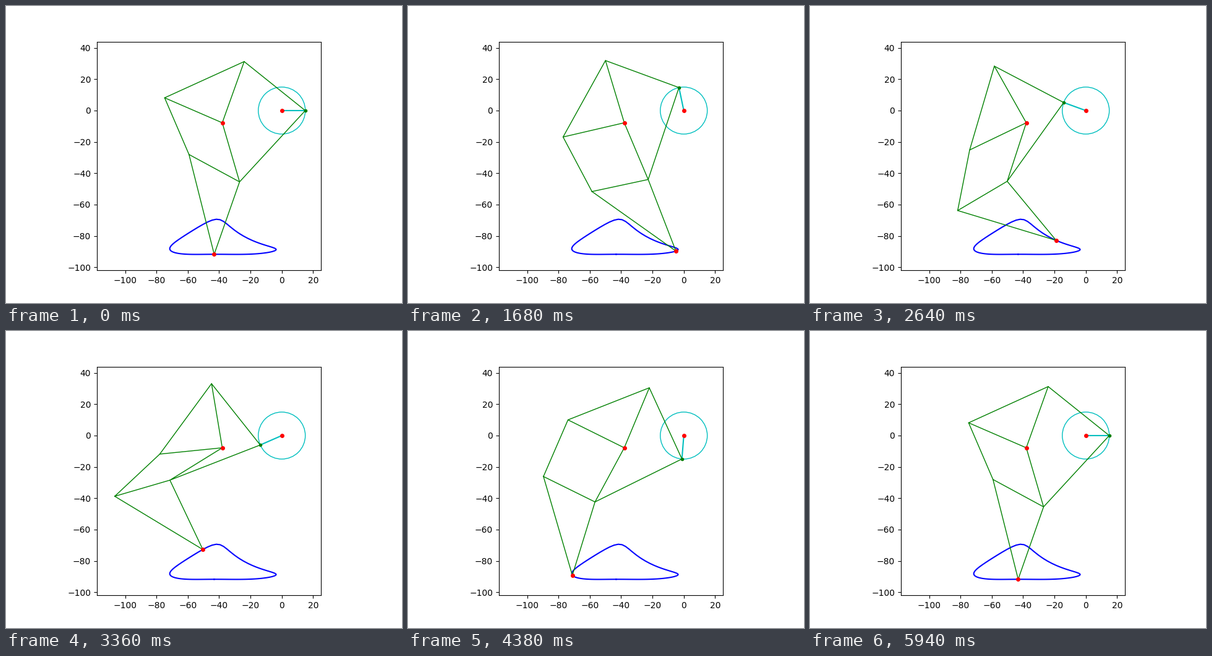
A matplotlib script for the animation above (6 s loop, 640 by 480 pixels).

```python
import numpy as np
import matplotlib.pyplot as plt
from matplotlib.animation import FuncAnimation

FRAMES = 100
CRANK = 15
PIVOT = complex(-38, -7.8)


def meet(p, q, rp, rq):
    """Point at distance rp from p and rq from q, left of the way p to q."""
    d = abs(q - p)
    along = (rp**2 - rq**2 + d**2) / (2 * d)
    across = np.sqrt(rp**2 - along**2)
    return p + (along + 1j * across) * (q - p) / d


def solve(angle):
    """Joints of the walking leg, as complex numbers, for a crank angle."""
    crank = CRANK * np.exp(1j * angle)
    top = meet(PIVOT, crank, 41.5, 50)
    knee = meet(crank, PIVOT, 61.9, 39.3)
    back = meet(PIVOT, top, 40.1, 55.8)
    ankle = meet(knee, back, 36.7, 39.4)
    foot = meet(knee, ankle, 49, 65.7)
    return crank, top, knee, back, ankle, foot


def place(line, points):
    points = np.atleast_1d(points)
    line.set_data(points.real, points.imag)


angles = np.linspace(0, 2 * np.pi, FRAMES)
path = solve(angles)[-1]

fig, ax = plt.subplots(figsize=(6.4, 4.8), dpi=100)
ax.set_aspect("equal")
ax.set_xlim(-118, 25)
ax.set_ylim(-102, 44)

ax.add_patch(plt.Circle((0, 0), CRANK, fill=False, ec="c", lw=1))
ax.plot(path.real, path.imag, "b", lw=1.5)
arm, = ax.plot([], [], "c", lw=1.5)
bars = [ax.plot([], [], "g", lw=1)[0] for _ in range(3)]
pin, = ax.plot([], [], "go", ms=3)
ax.plot([0, PIVOT.real], [0, PIVOT.imag], "ro", ms=4)
toe, = ax.plot([], [], "ro", ms=4)


def update(i):
    crank, top, knee, back, ankle, foot = solve(angles[i])
    place(arm, [0, crank])
    place(bars[0], [PIVOT, top, crank, knee, PIVOT])
    place(bars[1], [PIVOT, back, top])
    place(bars[2], [back, ankle, foot, knee, ankle])
    place(pin, crank)
    place(toe, foot)
    return [arm, *bars, pin, toe]


anim = FuncAnimation(fig, update, frames=FRAMES, interval=60, repeat=True)
plt.show()
```
